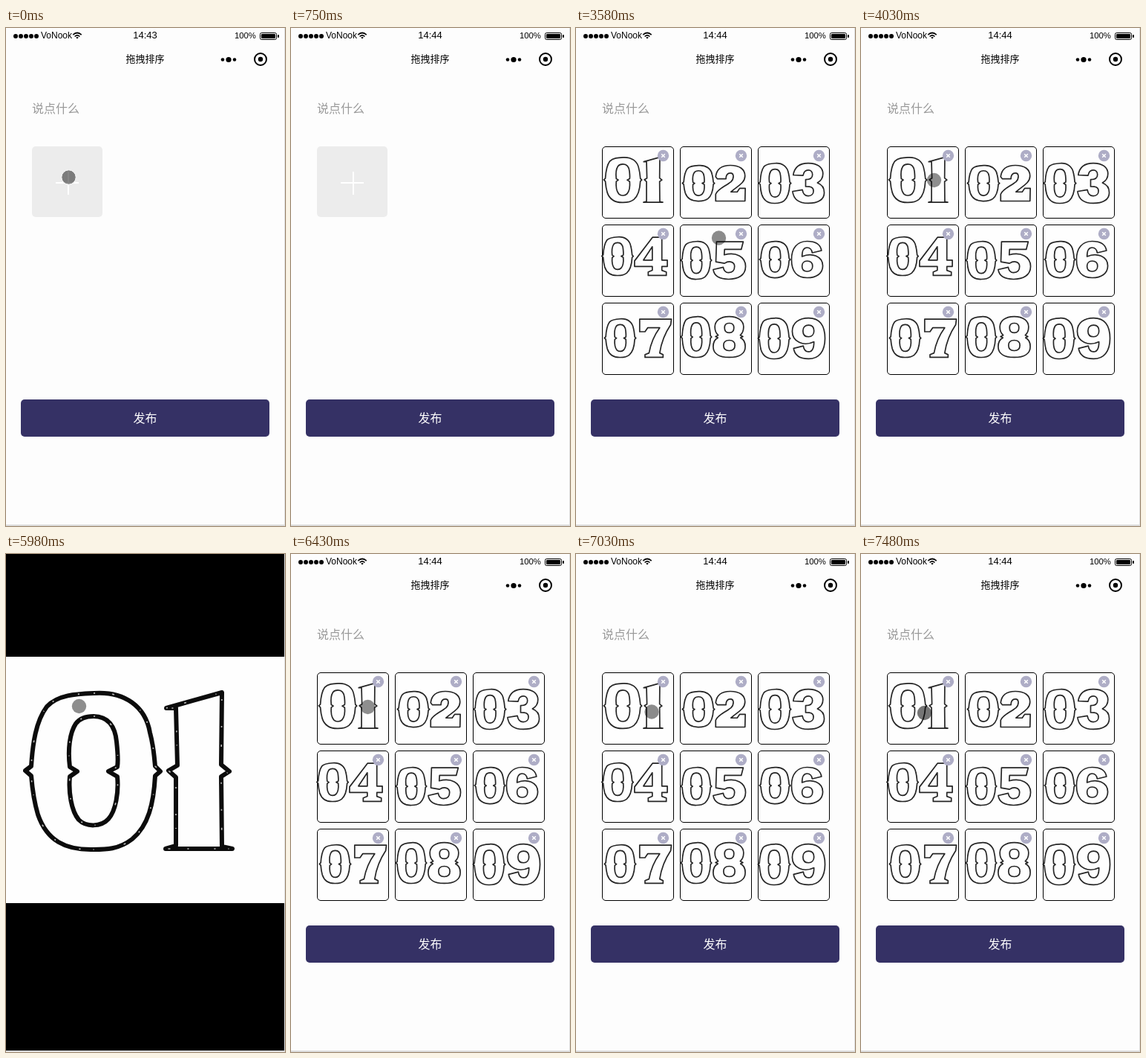
Animation, 376 px wide and 669 px high, one loop 8 s. Source, as an HTML page:

```html
<!DOCTYPE html>
<html lang="zh">
<head>
<meta charset="utf-8">
<style>
html, body { margin: 0; width: 100%; height: 100%; overflow: hidden; background: #fdfdfd; }
svg { display: block; width: 376px; height: 669px; }
text { font-family: "Noto Sans CJK SC", "Noto Sans CJK", "Noto Sans", sans-serif; }
.status text { font-family: "Liberation Sans", Arial, sans-serif; }
.glyph path { fill: none; stroke-linejoin: round; vector-effect: non-scaling-stroke; }
.thumb { stroke: #262626; stroke-width: 1.7px; }
.large { stroke: #0c0c0c; stroke-width: 6px; }
.speck { stroke: #bbb; stroke-width: 1.6px; stroke-dasharray: 2 23 3 41 1 17 2 34; }
</style>
</head>
<body>
<svg viewBox="0 0 376 669">
  <rect width="376" height="669" fill="#fdfdfd"/>
  <g id="page">
    <g class="status">
      <g id="signal"></g>
      <text x="47" y="14" font-size="12">VoNook</text>
      <g fill="none" stroke="#000" stroke-width="1.7">
        <path d="M90.3 9.2Q96 3.8 101.7 9.2M92.6 11.5Q96 8.3 99.4 11.5"/>
        <path d="M94.2 12.8Q96 11.4 97.8 12.8L96 14.6Z" fill="#000" stroke="none"/>
      </g>
      <text id="clock" x="187.5" y="14" font-size="13" text-anchor="middle"></text>
      <text x="308" y="14" font-size="11.3">100%</text>
      <rect x="342.5" y="6.5" width="22" height="9" rx="2" fill="none" stroke="#000"/>
      <rect x="344" y="8" width="19" height="6" rx="1"/>
      <rect x="366" y="9" width="2" height="4" rx="1"/>
    </g>
    <text x="187.5" y="46" font-size="13" text-anchor="middle">拖拽排序</text>
    <circle cx="292" cy="42.5" r="2.3"/>
    <circle cx="300" cy="42.5" r="3.6"/>
    <circle cx="308" cy="42.5" r="2.3"/>
    <circle cx="343" cy="42" r="8" fill="none" stroke="#000" stroke-width="2"/>
    <circle cx="343" cy="42" r="3.2"/>
    <text x="35" y="114" font-size="16" fill="#999">说点什么</text>
    <g id="add">
      <rect x="35" y="159" width="95" height="95" rx="5" fill="#ececec"/>
      <path d="M67 208H98M84 193V224" stroke="#fff" stroke-width="2"/>
    </g>
    <g id="grid"></g>
    <rect x="20" y="499" width="335" height="50" rx="5" fill="#353165"/>
    <text x="187.5" y="530" font-size="16" fill="#fff" text-anchor="middle">发布</text>
  </g>
  <g id="preview">
    <rect width="375" height="667"/>
    <rect y="138" width="375" height="331" fill="#fefefe"/>
  </g>
  <path d="M375.5 0V669" stroke="#e0e0e0"/>
  <path d="M0 668H376" stroke="#dcdcdc" stroke-width="2"/>
  <circle id="touch"/>
</svg>
<script>
const $ = id => document.getElementById(id);

// Digit outlines: box (x, y, w, h) and path drawn inside it
const unit = [0, 0, 100, 100];
const six = "M95 26L66 32C64 22 58 18 50 18C38 18 34 28 34 42C65 30 99 42 99 67C99 88 78 99 50 99C18 99 1 82 1 50C1 18 20 1 50 1C76 1 92 10 95 26ZM50 54C62 54 67 60 67 68C67 77 60 82 50 82C40 82 34 77 34 68C34 60 40 54 50 54Z";
const digits = [
  [[25, 184, 184, 215], "M118 187C160 184 188 205 194 240C199 258 200 275 201 285L208 292L201 298C199 335 192 365 170 383C152 397 134 397 118 397C80 398 55 385 43 350C37 330 35 310 34 298L26 291L34 285C36 255 40 225 55 205C70 189 95 188 118 187ZM118 218C138 218 147 232 149 252C151 270 151 280 150 286L138 292L150 299C152 320 148 345 138 356C128 367 108 367 98 357C88 345 84 320 86 299L96 292L86 286C83 262 86 240 94 228C100 220 108 218 118 218Z"],
  [[215, 184, 90, 215], "M216 207L291 186L290 283L301 292L290 299L291 393L305 396L215 396L229 392L229 300L219 291L231 284L229 207Z"],
  [unit, "M3 32C6 10 25 1 50 1C80 1 97 12 97 30C97 45 85 52 60 68L52 74L72 74L80 64L98 64L97 99L3 99L3 80C10 65 35 58 52 46C62 38 63 22 50 22C40 22 36 28 36 38L8 38Z"],
  [unit, "M4 30C8 8 25 1 50 1C80 1 95 12 95 27C95 38 88 45 78 49C92 53 99 62 99 73C99 91 78 99 50 99C22 99 5 90 2 70L32 66C34 76 40 81 50 81C60 81 66 76 66 69C66 60 58 58 42 58L42 41C56 41 63 38 63 29C63 22 58 18 50 18C41 18 36 23 34 31Z"],
  [unit, "M55 2L82 2L82 60L98 60L98 76L82 76L82 86L95 90L95 99L42 99L42 90L54 86L54 76L2 76L2 62ZM54 26L28 60L54 60Z"],
  [unit, "M12 2L92 2L86 22L36 22L35 36C70 28 99 40 99 66C99 90 75 99 48 99C22 99 5 92 2 74L32 68C34 78 40 82 48 82C60 82 66 76 66 66C66 54 50 50 36 58L10 54Z"],
  [unit, six],
  [unit, "M4 2L99 2L97 16C78 40 68 65 64 88L74 92L74 99L20 99L20 92L32 88C38 60 50 40 64 24L28 24L20 34L4 34Z"],
  [unit, "M50 1C78 1 93 12 93 26C93 36 90 41 83 46L91 49L84 52C94 56 98 63 98 73C98 90 80 99 50 99C20 99 2 90 2 73C2 63 6 56 16 52L9 49L17 46C10 41 7 36 7 26C7 12 22 1 50 1ZM50 17C60 17 64 21 64 28C64 36 60 40 50 40C40 40 36 36 36 28C36 21 40 17 50 17ZM50 58C62 58 67 62 67 70C67 79 61 83 50 83C39 83 33 79 33 70C33 62 38 58 50 58Z"],
  [[100, 100, -100, -100], six]
];

function glyph(n, x, y, w, h, style) {
  const [[bx, by, bw, bh], d] = digits[n];
  return `<g class="glyph" transform="translate(${x} ${y}) scale(${w / bw} ${h / bh}) translate(${-bx} ${-by})"><path class="${style}" d="${d}"/></g>`;
}

// Per picture: y, height, x and width of the zero, x and width of the second digit
const pictures = [
  [173, 62, 37, 52, 91, 26], [184, 49, 143, 44, 187, 42], [181, 55, 246, 44, 291, 44],
  [280, 53, 34.5, 43, 78, 46], [286, 52, 141, 42, 184, 45], [286, 50, 247, 42, 290, 43],
  [390, 53, 38, 43, 84, 45], [387, 56, 141, 42, 184, 45], [389, 56, 245, 44, 291, 45]
];

$("grid").innerHTML = pictures.map(([y, h, x0, w0, x1, w1], i) => {
  const left = 35 + i % 3 * 105, top = 159 + Math.floor(i / 3) * 105;
  return `<rect x="${left + .5}" y="${top + .5}" width="96" height="96" rx="4.5" fill="#fefefe" stroke="#000"/>`
    + glyph(0, x0, y, w0, h, "thumb") + glyph(i + 1, x1, y, w1, h, "thumb")
    + `<g transform="translate(${left + 82.5} ${top + 12.5})"><circle r="7.7" fill="#aeadc6"/>
       <path d="M-2.3-2.3L2.3 2.3M2.3-2.3L-2.3 2.3" stroke="#fff" stroke-width="1.5"/></g>`;
}).join("");

$("preview").innerHTML += `<g style="filter:blur(.7px)">` + ["large", "speck"].map(style =>
  glyph(0, 25, 184, 184, 215, style) + glyph(1, 215, 184, 90, 215, style)).join("") + "</g>";

$("signal").innerHTML = [13, 20, 27, 34, 41].map(x => `<circle cx="${x}" cy="11" r="3"/>`).join("");

// Touch point: start time, x, y, opacity
const touches = [
  [0, 84.5, 200.5, .48], [600, 0, 0, 0], [3150, 331.5, 377.5, .58], [3290, 247.5, 337.5, .45],
  [3440, 201.5, 281.5, .45], [3580, 192.5, 282, .45], [3730, 115.5, 219, .45], [3880, 101, 205.5, .45],
  [4030, 98.5, 204.5, .44], [6430, 103.5, 205.5, .44], [7030, 102, 212, .45], [7180, 105, 206, .45],
  [7330, 87, 216, .45], [7480, 85.5, 213.5, .54]
];

const show = (id, on) => $(id).style.display = on ? "" : "none";

function draw(now) {
  const t = now % 8000;
  $("clock").textContent = t < 750 ? "14:43" : "14:44";
  show("add", t < 3150);
  show("grid", t >= 3150);
  show("preview", t >= 5980 && t < 6430 || t >= 6580 && t < 7030);
  const [, x, y, alpha] = touches.findLast(k => k[0] <= t);
  const touch = $("touch");
  const attrs = { cx: x, cy: y, r: 9.7, "fill-opacity": alpha, stroke: t < 600 ? "#fafafa" : "none" };
  for (const k in attrs) touch.setAttribute(k, attrs[k]);
  requestAnimationFrame(draw);
}
requestAnimationFrame(draw);
</script>
</body>
</html>
```
